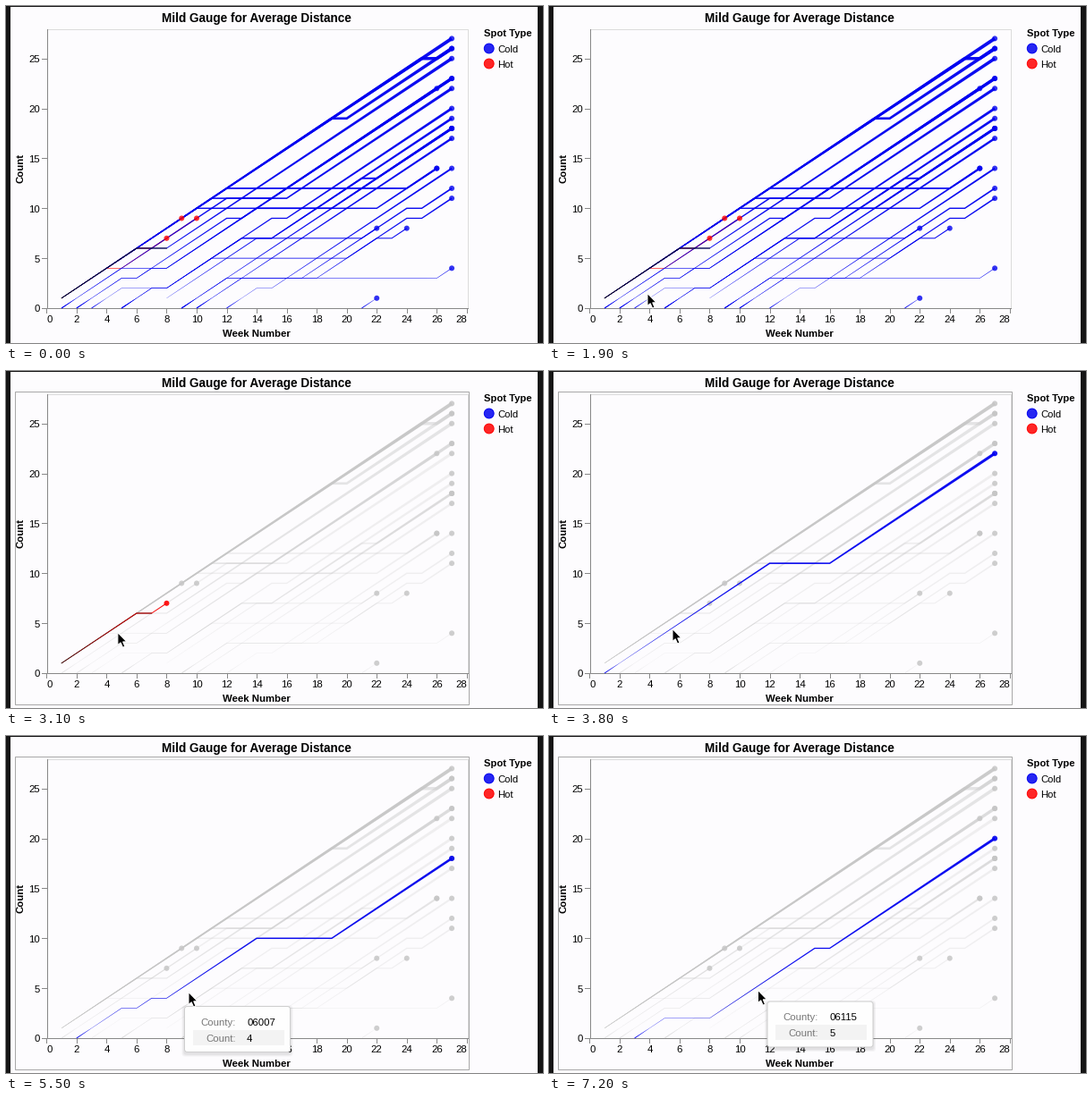
Recreate the animation shown at these times as a matplotlib script. Size 600 px wide and 377 px high, loop 7300 ms.

```python
import numpy as np
import matplotlib.pyplot as plt
from matplotlib.animation import FuncAnimation
from matplotlib.patches import Circle, FancyBboxPatch, Polygon, Rectangle

W, H, DPI = 600, 377, 64
STEP, FRAMES = 100, 73
BLUE, RED, GREY = "#0000f0", "#ff0000", "#c6c6c6"
plt.rcParams["font.family"] = "Liberation Sans"

fig = plt.figure(figsize=(W / DPI, H / DPI), dpi=DPI, facecolor="#fdfcfe")
ax = fig.add_axes([0, 0, 1, 1])
ax.set(xlim=(0, W), ylim=(H, 0))
ax.axis("off")


def px(v):
    return v * 72 / DPI


def sx(week):
    return 45.3 + 16.77 * np.asarray(week)


def sy(count):
    return 338 - 11.17 * np.asarray(count)


def label(x, y, s, size=11.4, ha="center", **kw):
    kw.setdefault("va", "center_baseline")
    return ax.text(x, y, s, fontsize=px(size), ha=ha, **kw)


def line(xs, ys, color, width=1, **kw):
    return ax.plot(xs, ys, color=color, lw=px(width), **kw)[0]


def box(x, y, w, h, **kw):
    return ax.add_patch(Rectangle((x, y), w, h, **kw))


# Surround, axes, titles and legend
box(0, 0, 4.5, H, fc="#151515", lw=0)
box(594, 0, 6, H, fc="#151515", lw=0)
box(0, 0, W, 1, fc="#151515", lw=0)
line([45.5, 515.5, 515.5], [25.5, 25.5, 338], "#dcdcdc")
line([45.5, 45.5, 515.5], [25.5, 338, 338], "#888888")
for week in range(0, 29, 2):
    x = float(sx(week))
    line([x, x], [338, 343], "#888888")
    label(x, 350.5, str(week), ha={0: "left", 28: "right"}.get(week, "center"))
for count in range(0, 26, 5):
    y = float(sy(count))
    line([40, 45], [y, y], "#888888")
    label(38, y + 0.5, str(count), ha="right")
label(280, 12.5, "Mild Gauge for Average Distance", 13.6, weight="bold")
label(280, 365.5, "Week Number", weight="bold")
label(16, 181.5, "Count", weight="bold", rotation=90, va="center")
label(533.5, 30, "Spot Type", 11.3, ha="left", weight="bold")
for y, name, color in [(47.5, "Cold", BLUE), (64.5, "Hot", RED)]:
    ax.add_patch(Circle((539.7, y), 5.4, fc=color, alpha=0.85, lw=0))
    ax.add_patch(Circle((539.7, y), 5.4, fc="none", ec=color, lw=px(1)))
    label(549.5, y + 0.5, name, 11.3, ha="left")
frame_box = box(9.5, 22.5, 507.5, 350.5, fc="none", ec="#a8a8a8", lw=px(1))


def climb(start, end, *stalls):
    """Weekly counts rising by one, except between each pair of stall weeks."""
    weeks = np.arange(start, end + 1)
    counts = weeks - start
    for a, b in zip(stalls[::2], stalls[1::2]):
        counts = counts - np.clip(weeks - a, 0, b - a)
    first = int(start in (0, 7))
    return weeks[first:], counts[first:]


def trail(weeks, counts):
    """Outline of a path whose width grows with its count."""
    mid = np.column_stack([sx(weeks), sy(counts)])
    way = np.diff(mid, axis=0)
    way /= np.hypot(*way.T)[:, None]
    normal = np.column_stack([-way[:, 1], way[:, 0]])
    normal = np.vstack([normal[:1], normal[:-1] + normal[1:], normal[-1:]])
    normal /= np.hypot(*normal.T)[:, None]
    width = np.where(counts == 0, 1, 0.1 + 0.14 * counts)
    side = normal * width[:, None] / 2
    return np.vstack([mid + side, (mid - side)[::-1]])


class Series:
    def __init__(self, color, start, end, *stalls):
        weeks, counts = climb(start, end, *stalls)
        self.color, self.end = color, (end, counts[-1])
        # Paths along the top edge are shared by several counties
        share = 1 if start or end < 27 else 2 if stalls else 8
        self.faded = 1 - 0.75 ** share
        self.trail = ax.add_patch(Polygon(trail(weeks, counts), lw=0))
        self.dot = ax.add_patch(Circle((sx(end), sy(counts[-1])), 3, lw=0))

    def show(self, chosen):
        if chosen is None:
            color, alpha, dot_alpha, z = self.color, 0.95, 0.8, 3
        elif chosen is self:
            color, alpha, dot_alpha, z = self.color, 0.95, 0.9, 6
        else:
            color, alpha, dot_alpha, z = GREY, self.faded, 0.85, 3
        self.trail.set(fc=color, alpha=alpha, zorder=z)
        self.dot.set(fc=color, alpha=dot_alpha, zorder=z + 1)


# Start week, end week, then pairs of stall weeks
EARLY = [(0, 27), (0, 27, 19, 20), (0, 27, 25, 26), (0, 27, 6, 8),
         (0, 27, 11, 15), (0, 26, 12, 24), (0, 26, 10, 22),
         (1, 26, 5, 8), (1, 27, 12, 16), (2, 27, 5, 6, 12, 13),
         (2, 27, 5, 6, 7, 8, 14, 19), (3, 27, 5, 8, 15, 16)]
LATE = [(5, 27, 7, 8, 13, 15, 21, 22), (5, 27, 7, 8, 13, 21, 24, 25),
        (5, 27, 7, 8, 11, 20, 24, 25), (7, 27, 14, 15), (9, 27), (10, 27),
        (12, 27, 14, 15), (9, 27, 12, 26), (9, 22, 12, 17),
        (10, 24, 13, 18, 22, 23), (21, 22)]
HOT = [(0, 8, 6, 7), (0, 9), (0, 10, 4, 5)]

hot = [Series(RED, *s) for s in HOT]
cold = [Series(BLUE, *s) for s in EARLY + LATE]
shade = line([], [], "#000000", 0.9, zorder=5)


def ending(week, count):
    return next(s for s in cold if s.end == (week, count))


CHOICES = [(0, None), (2100, hot[0]), (3200, ending(27, 22)),
           (4600, ending(27, 18)), (5900, ending(27, 20))]

# Tooltip: start, end, corner, county, count
TIPS = [(3200, 3700, 138, 303, "06071", "4"),
        (4600, 5300, 185.5, 300.5, "06007", "4"),
        (5400, 5500, 199.5, 302.5, "06007", "4"),
        (5900, 7300, 244, 297, "06115", "5")]


class Tooltip:
    def __init__(self):
        kw = dict(boxstyle="round,pad=0,rounding_size=3")
        self.shadows = [
            ax.add_patch(FancyBboxPatch((0, 0), 1, 1, fc="black", alpha=0.035,
                                        lw=0, zorder=8, **kw)) for _ in range(3)]
        self.card = ax.add_patch(FancyBboxPatch(
            (0, 0), 118, 51, fc="#fefefe", ec="#cfcfcf", lw=px(1), zorder=9, **kw))
        self.band = box(0, 0, 102, 17, fc="#f3f3f3", lw=0, zorder=10)
        self.keys = [label(0, 0, s, ha="right", color="#777777", zorder=11)
                     for s in ("County:", "Count:")]
        self.values = [label(0, 0, "", ha="left", zorder=11) for _ in range(2)]
        self.parts = [*self.shadows, self.card, self.band, *self.keys, *self.values]

    def show(self, tip):
        for part in self.parts:
            part.set_visible(tip is not None)
        if tip is None:
            return
        x, y, *texts = tip
        for grow, shadow in enumerate(self.shadows, 1):
            shadow.set_bounds(x - grow, y + 2 - grow, 118 + 2 * grow, 51 + 2 * grow)
        self.card.set_bounds(x, y, 118, 51)
        self.band.set_xy((x + 9, y + 26))
        for row, text in enumerate(texts):
            line_y = y + 17.5 + 17.5 * row
            self.keys[row].set_position((x + 57, line_y))
            self.values[row].set_position((x + 69.5, line_y))
            self.values[row].set_text(text)


tooltip = Tooltip()

ARROW = np.array([(0, 0), (0, 14), (3.2, 11.2), (5.6, 16.6), (8, 15.6),
                  (5.7, 10.3), (10, 10.3)])
cursor = ax.add_patch(Polygon(ARROW, fc="black", ec="white", lw=px(1), zorder=12))

# Cursor moves: start, end, target
HOME = np.array([96, 378])
MOVES = [(900, 1700, 110, 321.5), (1900, 2200, 116, 291.5),
         (2900, 3200, 128, 293), (3600, 3800, 138, 288.5),
         (3900, 4300, 172, 292), (4500, 4700, 179, 289.5),
         (5200, 5400, 189, 291.5), (5400, 5500, 204, 286.5),
         (5500, 5900, 233.5, 284.5)]


def cursor_at(t):
    pos = HOME
    for start, end, *target in MOVES:
        u = np.clip((t - start) / (end - start), 0, 1)
        pos = pos + (np.array(target) - pos) * u * u * (3 - 2 * u)
    return pos


def update(n):
    t = n * STEP
    chosen = [c for start, c in CHOICES if start <= t][-1]
    for s in hot + cold:
        s.show(chosen)
    frame_box.set_visible(chosen is not None)

    # Dark hairline along the early weeks
    last = 8 if chosen is None else 7
    shade.set_data(sx([1, 6, last]), sy([1, 6, 6]))
    shade.set_visible(chosen in (None, hot[0]))

    tooltip.show(next((tip[2:] for tip in TIPS if tip[0] <= t <= tip[1]), None))
    cursor.set_visible(t > 900)
    cursor.set_xy(ARROW + cursor_at(t))
    return []


anim = FuncAnimation(fig, update, frames=FRAMES, interval=STEP, repeat=True,
                     repeat_delay=0, blit=False)
plt.show()
```
